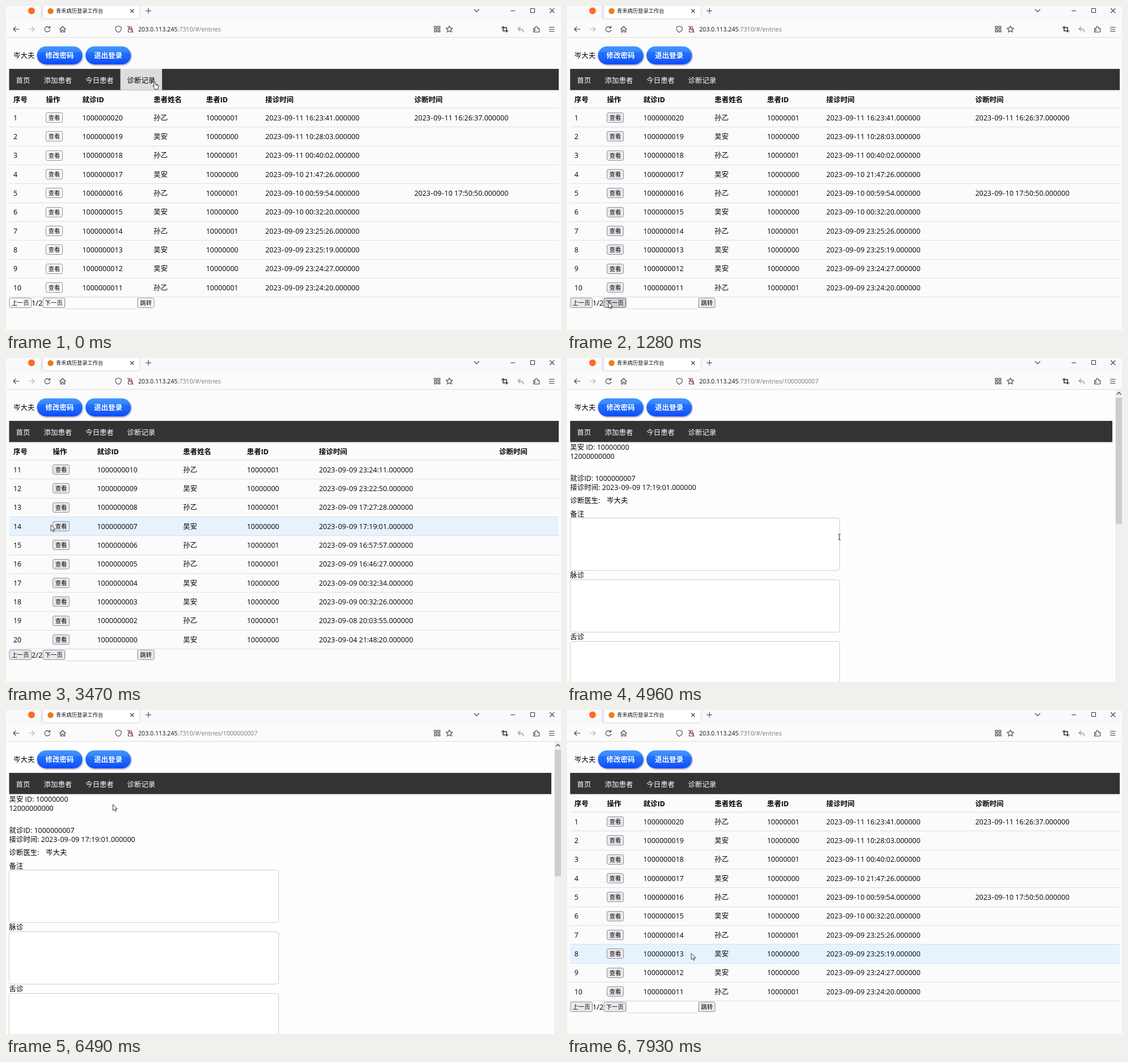
Recreate the animation shown at these times as an HTML page. Size 978 by 572 pixels, loop 8000 ms.

```html
<!DOCTYPE html>
<html lang="zh">
<head>
<meta charset="utf-8">
<title>Records</title>
<style>
html, body { margin: 0; width: 100%; height: 100%; overflow: hidden; background: #fbfbfb; }
svg { display: block; width: 978px; height: 572px; }
text { font-family: "Open Sans", "Noto Sans CJK SC", "Noto Sans CJK", sans-serif; white-space: pre; }
</style>
</head>
<body>
<svg id="stage" viewBox="0 0 978 572" xmlns="http://www.w3.org/2000/svg">
  <defs>
    <linearGradient id="blue" x1="0" y1="0" x2="0" y2="1">
      <stop offset="0" stop-color="#4196ff"/>
      <stop offset=".3" stop-color="#3585ff"/>
      <stop offset=".34" stop-color="#2472fb"/>
      <stop offset=".65" stop-color="#1c63fa"/>
      <stop offset="1" stop-color="#0a4cff"/>
    </linearGradient>
    <filter id="soft" x="-20%" y="-30%" width="140%" height="180%">
      <feDropShadow dx="1" dy="1.5" stdDeviation="1.3" flood-color="#000" flood-opacity=".42"/>
    </filter>
    <filter id="tabShade" x="-10%" y="-30%" width="120%" height="160%">
      <feDropShadow dx="0" dy="0" stdDeviation="1.2" flood-color="#000" flood-opacity=".35"/>
    </filter>
    <clipPath id="view"><rect y="56" width="978" height="516"/></clipPath>
  </defs>
  <g id="page" clip-path="url(#view)"></g>
  <g id="chrome"></g>
  <g id="pointer"></g>
</svg>
<script>
const LOOP = 8000;
const DOCTOR = '岑大夫';
const PATIENTS = ['吴安', '孙乙'];
const HOST = '203.0.113.245';
const LINE = 33.33;
const el = id => document.getElementById(id);

// time, view, pointer x, pointer y, pointer shape, scroll
const STEPS = [
  [0, 'one', 262, 133, 'hand'],
  [150, 'one', 258, 152, 'arrow'],
  [290, 'one', 240, 205, 'arrow'],
  [430, 'one', 212, 272, 'arrow'],
  [560, 'one', 176, 345, 'beam'],
  [700, 'one', 136, 410, 'arrow'],
  [840, 'one', 100, 462, 'arrow'],
  [980, 'one', 70, 503, 'arrow'],
  [1120, 'one', 54, 521, 'arrow'],
  [1280, 'one', 73, 523, 'arrow'],
  [1710, 'two', 76, 521, 'arrow'],
  [1850, 'two', 112, 458, 'arrow'],
  [2000, 'two', 174, 368, 'beam'],
  [2140, 'two', 218, 304, 'beam'],
  [3070, 'two', 206, 311, 'beam'],
  [3200, 'two', 166, 324, 'beam'],
  [3340, 'two', 114, 317, 'arrow'],
  [3470, 'two', 79, 295, 'arrow'],
  [3590, 'two', 87, 296, 'arrow'],
  [3730, 'two', 94, 297, 'arrow'],
  [4290, 'detail', 94, 300, 'beam'],
  [4440, 'detail', 210, 304, 'beam'],
  [4590, 'detail', 380, 311, 'beam'],
  [4960, 'detail', 480, 316, 'beam'],
  [5110, 'detail', 480, 316, 'arrow', 210],
  [5230, 'detail', 480, 316, 'arrow', 420],
  [5950, 'detail', 466, 306, 'arrow', 260],
  [6120, 'detail', 392, 262, 'arrow', 90],
  [6300, 'detail', 280, 208, 'arrow'],
  [6490, 'detail', 188.5, 167, 'arrow'],
  [6610, 'detail', 214, 153, 'arrow'],
  [6730, 'detail', 236, 141, 'hand'],
  [6850, 'detail', 245, 136, 'hand'],
  [7000, 'detail', 243, 135, 'hand'],
  [7120, 'detail', 241, 134, 'hand'],
  [7500, 'one', 240, 136, 'hand'],
  [7640, 'one', 237, 205, 'arrow'],
  [7790, 'one', 227, 345, 'arrow'],
  [7930, 'one', 219, 430, 'arrow']
];

const LISTS = {
  one: {
    page: 1, who: '1010101001',
    cols: [13, 70.5, 134.5, 260, 352.5, 457, 719.5],
    seen: ['11 16:23:41', '11 10:28:03', '11 00:40:02', '10 21:47:26', '10 00:59:54',
      '10 00:32:20', '09 23:25:26', '09 23:25:19', '09 23:24:27', '09 23:24:20'],
    done: { 0: '11 16:26:37', 4: '10 17:50:50' }
  },
  two: {
    page: 2, who: '1010110010',
    cols: [13, 82.5, 160.5, 312, 424.5, 551.5, 869],
    seen: ['09 23:24:11', '09 23:22:50', '09 17:27:28', '09 17:19:01', '09 16:57:57',
      '09 16:46:27', '09 00:32:34', '09 00:32:26', '08 20:03:55', '04 21:48:20'],
    done: {}
  }
};

// y is the middle of the line
function text(x, y, s, o = {}) {
  const size = o.size || 12.45;
  return `<text x="${x}" y="${y + size * .37}" font-size="${size}" fill="${o.fill || '#000'}"` +
    ` font-weight="${o.bold ? 700 : 400}" text-anchor="${o.mid ? 'middle' : 'start'}">${s}</text>`;
}

const rect = (x, y, w, h, fill, more = '') =>
  `<rect x="${x}" y="${y}" width="${w}" height="${h}" fill="${fill}" ${more}/>`;

const path = (d, color = '#3a3a42', w = 1.1, fill = 'none') =>
  `<path d="${d}" stroke="${color}" stroke-width="${w}" fill="${fill}" stroke-linecap="round" stroke-linejoin="round"/>`;

// hyphens get a little air on both sides
const stamp = s => `2023-09-${s}.000000`.replace(/-/g, '<tspan dx=".6" letter-spacing=".6">-</tspan>');

function button(x, y, w, label, p) {
  const hot = p.x >= x && p.x <= x + w && p.y >= y && p.y <= y + 17;
  const fill = hot ? '#d0d0d7' : p.t < 150 ? '#fafafb' : '#e9e9ed';
  return rect(x, y, w, 17, fill, `rx="2.5" stroke="${hot ? '#676774' : '#8f8f9d'}"`) +
    text(x + w / 2, y + 8.8, label, { size: 10.3, mid: true });
}

function pill(x, label) {
  return rect(x, 71.3, 80, 31.7, 'url(#blue)', 'rx="15.8" filter="url(#soft)"') +
    text(x + 40, 87.3, label, { bold: true, fill: '#fff', mid: true });
}

function header(right, p) {
  const hot = p.x > 201 && p.x < 275 && p.y > 111 && p.y < 148;
  let s = text(13, 87, DOCTOR) + pill(54.5, '修改密码') + pill(140, '退出登录');
  s += rect(5.5, 111, right - 5.5, 37.5, '#333');
  if (hot) s += rect(201.5, 111, 73.5, 37.5, '#ddd');
  ['首页', '添加患者', '今日患者', '诊断记录'].forEach((label, i) => {
    s += text([17.5, 66.5, 140, 213.3][i], 131, label, { fill: hot && i === 3 ? '#000' : '#fff' });
  });
  return s;
}

function list(data, p) {
  const c = data.cols;
  let s = rect(0, 56, 978, 516, '#fbfbfb') + header(974, p);
  ['序号', '操作', '就诊ID', '患者姓名', '患者ID', '接诊时间', '诊断时间'].forEach((h, i) => {
    s += text(c[i], 165, h, { bold: true });
  });
  for (let i = 0; i < 10; i++) {
    const top = 180.2 + LINE * i, y = 197 + LINE * i;
    const n = (data.page - 1) * 10 + i + 1;
    const visit = 1000000000 + (n === 20 ? 0 : 21 - n);
    const who = +data.who[i];
    if (p.y >= top && p.y < top + LINE) s += rect(5.5, top, 968.5, LINE, '#e6f3ff');
    s += text(c[0], y, n) + button(c[1], Math.round(y) - 8.5, 29, '查看', p) +
      text(c[2], y, visit) + text(c[3], y, PATIENTS[who]) +
      text(c[4], y, 10000000 + who) + text(c[5], y, stamp(data.seen[i]));
    if (data.done[i]) s += text(c[6], y, stamp(data.done[i]));
  }
  for (let i = 0; i < 11; i++)
    s += rect(5.5, Math.round(180 + LINE * i), 968.5, 1, '#dedede');
  s += button(6, 515.5, 38.5, '上一页', p) + text(45, 524, data.page + '/2', { size: 12.9 }) +
    button(65, 515.5, 38.5, '下一页', p) +
    rect(104.5, 514, 127, 20.5, '#fdfdfd', 'rx="2" stroke="#d9d9d9"') +
    button(232, 515.5, 29, '跳转', p);
  return s;
}

function detail(p) {
  let s = rect(0, 56, 978, 516, '#fefefe') + `<g transform="translate(0 ${-p.scroll})">` + header(961, p);
  s += text(5.5, 157, PATIENTS[0] + ' ID: 10000000') + text(5.5, 173, '12000000000') +
    text(5.5, 212, '就诊ID: 1000000007') +
    text(5.5, 228, '接诊时间: ' + stamp('09 17:19:01')) +
    text(5.5, 251, '诊断医生:') + text(70, 251, DOCTOR);
  ['备注', '脉诊', '舌诊', '望诊', '闻诊', '问诊', '切诊'].forEach((label, i) => {
    const y = 275 + 108.8 * i;
    s += text(5.5, y, label) +
      rect(5.5, Math.round(y + 7) + .5, 475, 92.5, '#fff', 'rx="3.5" stroke="#ccc"');
  });
  s += '</g>' + rect(966, 56, 12, 516, '#f0f0f0') +
    rect(967, 70 + p.scroll * .44, 11, 223.5, '#cdcdcd') +
    path('M969.5 64L972.7 60.5L975.9 64', '#505050', 1.5);
  return s;
}

function chrome(url) {
  const dark = '#3a3a42', pale = '#b4b4b9';
  let s = rect(0, 0, 978, 55.5, '#f9f9fb') + rect(0, 25, 978, 30, '#fbfbfc') + rect(0, 55, 978, 1, '#dcdce0');
  s += '<circle cx="45" cy="8.5" r="6" fill="#ff6a2b"/>' + rect(62, 0, 1, 24, '#cfcfd4');
  s += rect(65.5, -8, 170, 30, '#fff', 'rx="3" filter="url(#tabShade)"');
  s += '<circle cx="78.5" cy="9" r="5.2" fill="#f07a1a"/>' +
    text(88, 8.7, '青禾病历登录工作台', { size: 9.25, fill: '#15141a' });
  s += path('M219.5 6L225 11.5M225 6L219.5 11.5') + path('M246.5 8.5H255.5M251 4V13') +
    path('M825 6L829.3 10.3L833.6 6') + path('M889.5 8.5H897') +
    path('M924.5 4.5H931.5V11.5H924.5Z') + path('M958.5 4.5L966 12M966 4.5L958.5 12');
  // navigation
  s += path('M23 41H13M17 37L13 41L17 45') + path('M40 41H50M46 37L50 41L46 45', pale) +
    path('M76.6 38A4.7 4.7 0 1 0 77.6 42.3M77.5 35.5V39H74') +
    path('M94.8 41L99.8 36L104.8 41M96 40V46H98.5V42.5H101.2V46H103.6V40');
  // address
  s += path('M198 35.6L203 37.2V40.5Q202.8 44.2 198 46.6Q193.2 44.2 193 40.5V37.2Z', '#4a4a52') +
    path('M215.5 40.5H222.5V46H215.5ZM216.8 40.5V38.2A2.2 2.2 0 0 1 221.2 38.2V40.5', '#4a4a52') +
    path('M214.5 35.5L224 46', '#e22850', 1.3);
  s += text(233, 41, `${HOST}<tspan fill="#77777f">:7310/#/${url}</tspan>`, { size: 10.65, fill: '#15141a' });
  for (const [x, y] of [[755, 36], [761, 36], [755, 42], [761, 42]])
    s += rect(x, y, 3.6, 3.6, 'none', `stroke="${dark}" stroke-width="1.2"`);
  let star = '';
  for (let i = 0; i < 10; i++) {
    const a = i * Math.PI / 5 - Math.PI / 2, r = i % 2 ? 2.8 : 6;
    star += (i ? 'L' : 'M') + (781.3 + r * Math.cos(a)).toFixed(1) + ' ' + (41.2 + r * Math.sin(a)).toFixed(1);
  }
  s += path(star + 'Z') + path('M876 36V44H884.5M874 38.2H882V46', dark, 1.7) +
    path('M906 37L902 40.5L906 44M902.5 40.5H907Q911.5 41 911.5 46', '#a0a0a6', 1.5) +
    path('M929.5 39.5H932.5V37.5Q934.5 34.8 936.5 37.5V39.5H939.5V46H929.5V43.8H931.5Q933.5 42.5 931.5 41.5H929.5Z') +
    path('M957.5 37.5H966M957.5 41H966M957.5 44.5H966');
  return s;
}

const POINTERS = {
  arrow: path('M0 0V10.4L2.4 8.3L4.1 12L5.8 11.2L4.2 7.6H7.3Z', '#222', .9, '#fff'),
  beam: path('M-2 -4.8H-.6L0 -4.2L.6 -4.8H2M0 -4.2V4.2M-2 4.8H-.6L0 4.2L.6 4.8H2', '#333', 1),
  hand: path('M-1.2 8V1Q0 -1 1.2 1V5.2L5.6 6.2Q7 6.6 6.8 8.5L6 12V14H.2V12.5L-3 9Q-3.4 7 -1.2 8Z', '#222', .9, '#fff') +
    path('M3 6V7.5M5 6.3V7.8', '#222', .8)
};

function draw([t, view, x, y, shape, scroll = 0]) {
  const p = { t, x, y, scroll };
  el('page').innerHTML = view === 'detail' ? detail(p) : list(LISTS[view], p);
  el('chrome').innerHTML = chrome(view === 'detail' ? 'entries/1000000007' : 'entries');
  el('pointer').innerHTML = POINTERS[shape];
  el('pointer').setAttribute('transform', `translate(${x} ${y})`);
}

let shown = -1;
function tick() {
  const t = performance.now() % LOOP;
  let i = STEPS.length - 1;
  while (STEPS[i][0] > t) i--;
  if (i !== shown) draw(STEPS[shown = i]);
  requestAnimationFrame(tick);
}
tick();
</script>
</body>
</html>
```
